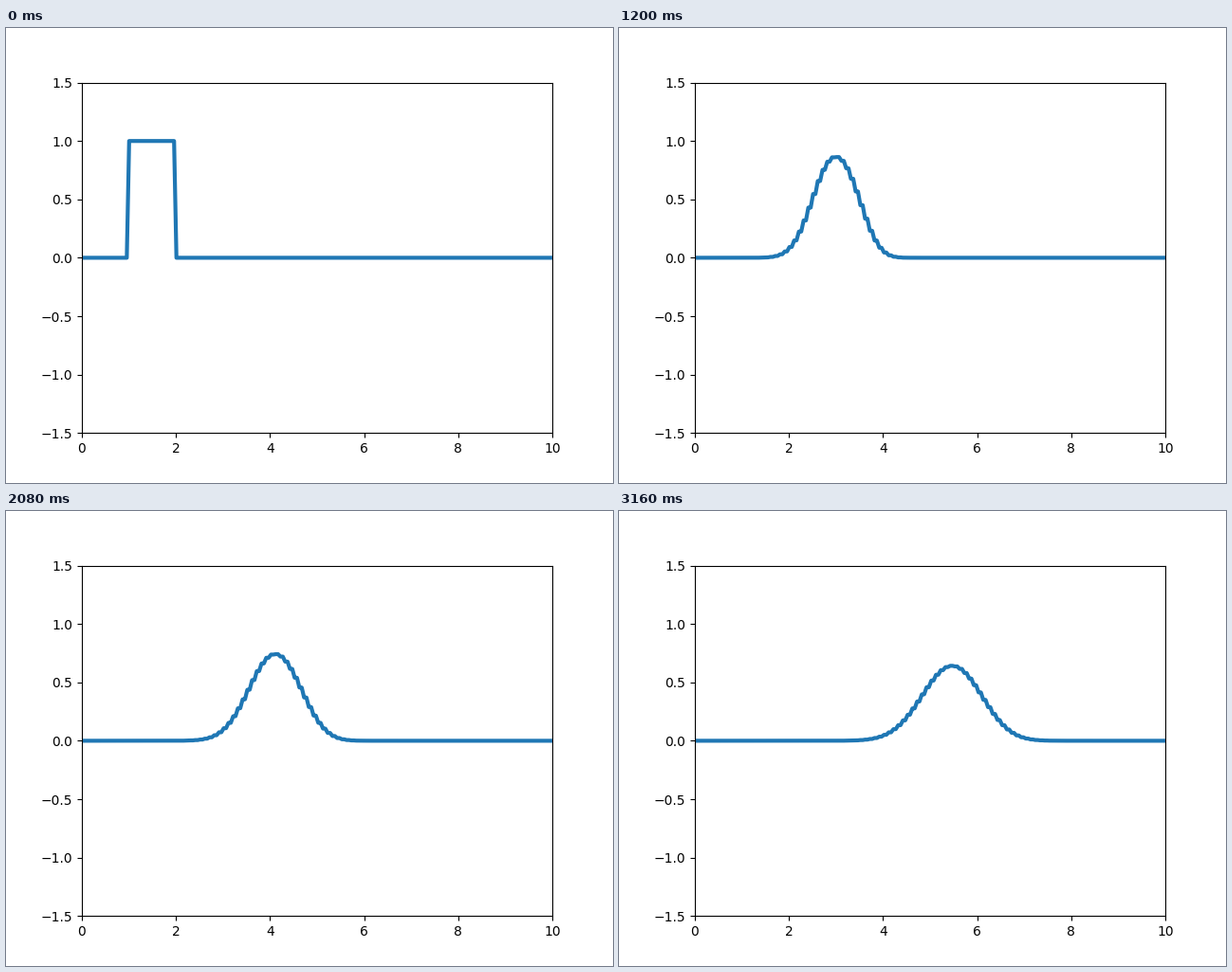
Animation of 640 by 480 pixels, one loop 3180 ms. Source, as a matplotlib script:

```python
import matplotlib.pyplot as plt
import numpy as np
from matplotlib.animation import FuncAnimation

# Square pulse advected with the Lax-Friedrichs scheme
NX = 200
STEPS = 159
CFL = 0.5

x = np.linspace(0, 10, NX)


def advance(u):
    left, right = np.roll(u, 1), np.roll(u, -1)
    return 0.5 * (left + right) - 0.5 * CFL * (right - left)


def solve():
    u = np.where((x >= 1) & (x <= 2), 1.0, 0.0)
    history = [u]
    for _ in range(STEPS - 1):
        u = advance(u)
        history.append(u)
    return history


history = solve()

fig, ax = plt.subplots(figsize=(6.4, 4.8), dpi=100)
ax.set_xlim(0, 10)
ax.set_ylim(-1.5, 1.5)
line, = ax.plot(x, history[0], lw=3)


def update(i):
    line.set_ydata(history[i])
    return line,


anim = FuncAnimation(fig, update, frames=STEPS, interval=20,
                     repeat=True, repeat_delay=0)
plt.show()
```
